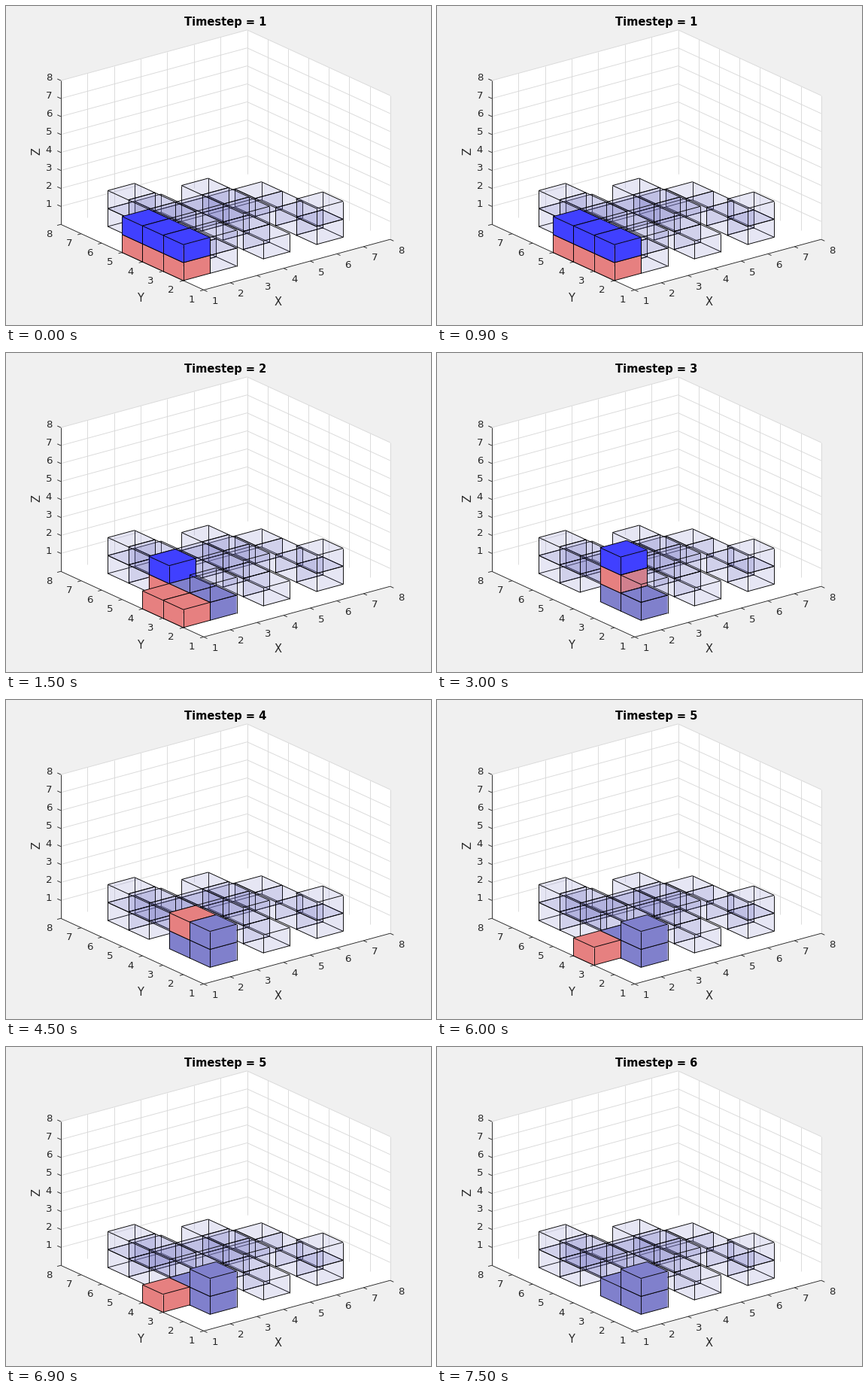
A matplotlib script that plays this animation: 565 px wide and 424 px high, repeating every 8000 ms.

```python
import matplotlib.pyplot as plt
from matplotlib.animation import FuncAnimation
from matplotlib.patches import Polygon
from itertools import product

W, H, DPI = 565, 424, 100
STEP_MS, TICK_MS, LOOP_MS = 1500, 500, 8000
INK = "#262626"
GRID = "#d9d9d9"
RED, BLUE, VIOLET = (0.9, 0.5, 0.5), (0.25, 0.25, 1), (0.5, 0.5, 0.8)
PX = 72 / DPI

plt.rcParams["font.family"] = "DejaVu Sans"
fig = plt.figure(figsize=(W / DPI, H / DPI), dpi=DPI, facecolor="#f0f0f0")
ax = fig.add_axes([0, 0, 1, 1])
ax.set_xlim(0, W)
ax.set_ylim(H, 0)
ax.axis("off")


def project(x, y, z):
    """Orthographic view of a grid point, in pixels."""
    return (262.9 + 35.4 * (x - 1) - 27.15 * (y - 1),
            377.4 - 9.6 * (x - 1) - 12.45 * (y - 1) - 23.9 * z)


def segment(a, b, color, width=0.9, z=1.0):
    (x0, y0), (x1, y1) = a, b
    return ax.plot([x0, x1], [y0, y1], color=color, lw=width * PX, zorder=z,
                   solid_capstyle="butt")[0]


def label(x, y, text, size, **kw):
    opts = dict(color=INK, ha="center", va="baseline", fontsize=size * PX)
    opts.update(kw)
    return ax.text(x, y, text, **opts)


def draw_axes():
    hull = [(1, 1, 0), (8, 1, 0), (8, 1, 8), (8, 8, 8), (1, 8, 8), (1, 8, 0)]
    ax.add_patch(Polygon([project(*p) for p in hull], fc="white", ec="none",
                         zorder=0))
    for k in range(1, 9):
        walls = [((k, 8, 0), (k, 8, 8)), ((8, k, 0), (8, k, 8)),
                 ((1, 8, k), (8, 8, k)), ((8, 1, k), (8, 8, k))]
        for a, b in walls:
            segment(project(*a), project(*b), GRID)
    for end in [(8, 1, 0), (1, 8, 0)]:
        segment(project(1, 1, 0), project(*end), INK, z=2)
    segment(project(1, 8, 0), project(1, 8, 8), INK, z=2)

    for k in range(1, 9):
        x, y = project(k, 1, 0)
        segment((x, y), (x + 4.6, y + 2.1), INK, z=2)
        label(x + 14.5, y + 18.6, k, 13.33)
        x, y = project(1, k, 0)
        segment((x, y), (x - 4.8, y + 1.3), INK, z=2)
        label(x - 16, y + 16.5, k, 13.33)
        x, y = project(1, 8, k)
        segment((x, y), (x - 4.6, y - 2.1), INK, z=2)
        label(x - 15.8, y + 0.3, k, 13.33)
    label(362, 398, "X", 14.67)
    label(178.5, 393, "Y", 14.67)
    label(41, 193.5, "Z", 14.67, rotation=90, va="center")


def face(axis, side):
    """Corners of one side of the unit cube."""
    ring = [(0, 0), (1, 0), (1, 1), (0, 1)]
    return [c[:axis] + (side,) + c[axis:] for c in ring]


def edges():
    corners = list(product((0, 1), repeat=3))
    return [(a, b) for a in corners for b in corners
            if a < b and sum(abs(i - j) for i, j in zip(a, b)) == 1]


BACK = [face(0, 1), face(1, 1), face(2, 0)]
FRONT = [face(0, 0), face(1, 0), face(2, 1)]
HIDDEN = (1, 1, 0)
EDGES = edges()


def draw_cube(cell, color, alpha, z):
    def at(c):
        return project(*(p + q for p, q in zip(cell, c)))

    def fill(f, depth):
        return ax.add_patch(Polygon([at(c) for c in f], fc=color, ec="none",
                                    alpha=alpha, zorder=depth))

    parts = []
    if alpha < 1:
        parts += [fill(f, z) for f in BACK]
    parts += [fill(f, z + 0.4) for f in FRONT]
    for a, b in EDGES:
        inner = HIDDEN in (a, b)
        if alpha < 1 or not inner:
            parts.append(segment(at(a), at(b), "black",
                                 z=z + (0.2 if inner else 0.6)))
    return parts


def along_y(x, ys, z):
    return [(x, y, z) for y in ys]


GOAL = (along_y(2, (2, 3, 5, 6), 0) + along_y(2, (2, 4, 5, 6), 1)
        + along_y(4, (2, 3, 4, 5), 0) + along_y(4, (3, 4, 5), 1)
        + along_y(6, (2, 3, 4, 5), 0) + [(6, 2, 1)]
        + [(3, 6, 0), (3, 5, 0), (3, 4, 1), (5, 5, 0)])

base = {(2, 2, 0): VIOLET, (2, 3, 0): VIOLET}
tower = {**base, (2, 2, 1): VIOLET}
STEPS = [
    {(1, y, z): (RED, BLUE)[z] for y in (2, 3, 4) for z in (0, 1)},
    {**base, (1, 2, 0): RED, (1, 3, 0): RED, (2, 4, 0): RED, (2, 4, 1): BLUE},
    {**base, (2, 3, 1): RED, (2, 3, 2): BLUE},
    {**tower, (2, 3, 1): RED},
    {**tower, (1, 3, 0): RED},
    tower,
]


def draw_step(solid):
    cells = set(GOAL) | set(solid)
    far_first = sorted(cells, key=lambda c: (-c[0], -c[1], c[2]))
    parts = []
    for i, cell in enumerate(far_first):
        color = solid.get(cell, VIOLET)
        parts += draw_cube(cell, color, 1 if cell in solid else 0.1, 10 + i)
    return parts


draw_axes()
title = label(291.5, 26, "", 14.67, color="black", weight="bold")
groups = [draw_step(s) for s in STEPS]


def update(i):
    now = i * TICK_MS // STEP_MS
    title.set_text(f"Timestep = {now + 1}")
    for k, group in enumerate(groups):
        for part in group:
            part.set_visible(k == now)
    return [title]


anim = FuncAnimation(fig, update, frames=LOOP_MS // TICK_MS, interval=TICK_MS,
                     init_func=lambda: update(0), repeat=True, repeat_delay=0)
plt.show()
```
